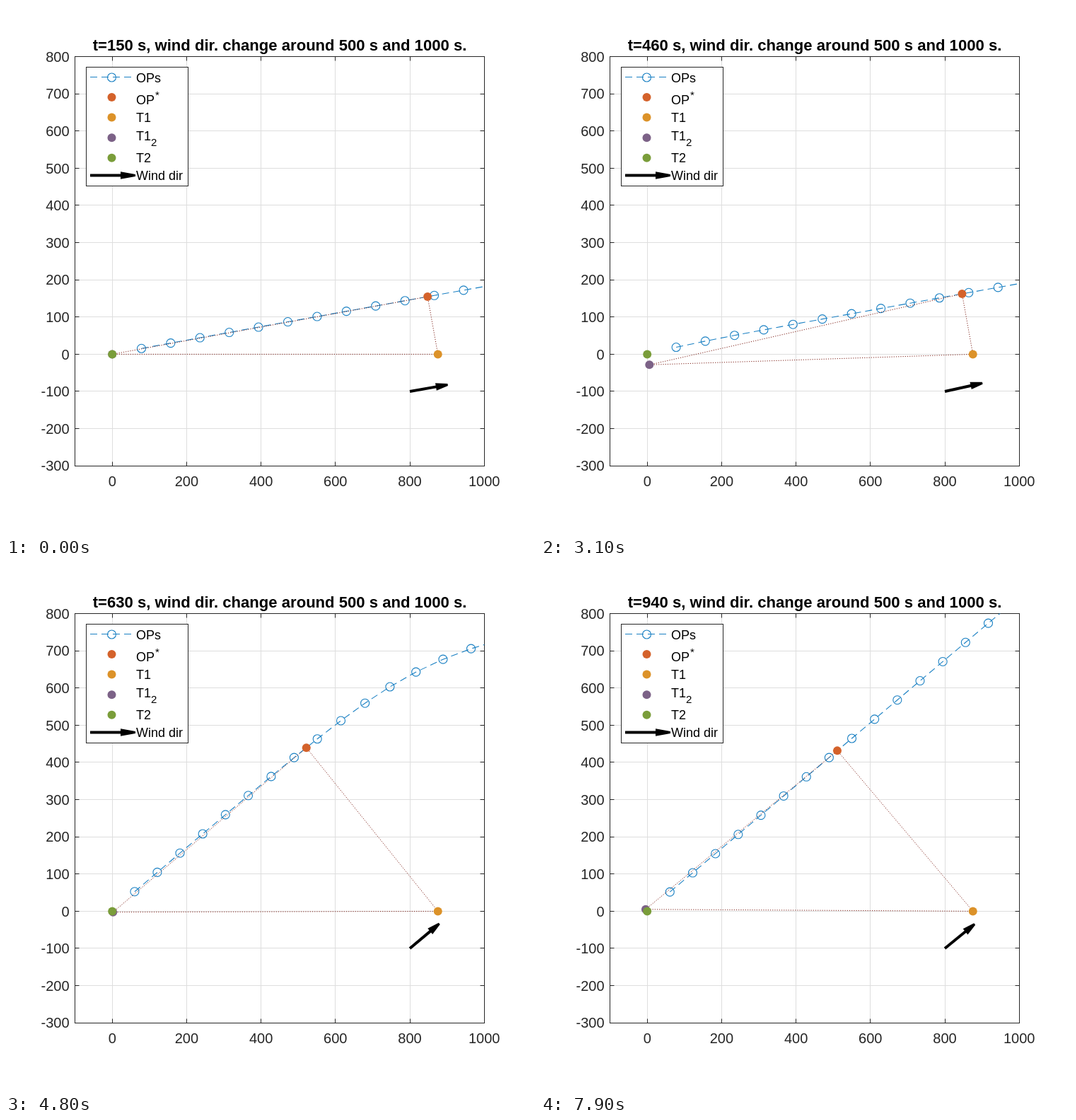
These frames come from a looping animation (748x748 px, 8000 ms). An HTML page with a canvas:

```html
<!DOCTYPE html>
<html>
<head>
<meta charset="utf-8">
<style>
html, body { margin: 0; width: 100%; height: 100%; overflow: hidden; background: #fff; }
canvas { display: block; }
</style>
</head>
<body>
<canvas id="stage" width="748" height="748"></canvas>
<script>
const ctx = document.getElementById('stage').getContext('2d');
const LEFT = 97.5, RIGHT = 676.5, TOP = 71.5, BOTTOM = 650.5;
const SCALE = 0.526, STEP = 80;
const INK = '#262626', BLUE = '#1a80c3', DOTTED = '#80241c';
const COLORS = { op: '#d4622b', t1: '#dc9229', t12: '#7c6287', t2: '#7a9d3a' };
const px = x => 150.2 + x * SCALE;
const py = y => 492.39 - y * SCALE;

const logistic = x => 1 / (1 + Math.exp(-x));
const windAngle = t => (10 + 30 * logistic((t - 500) / 16.5)
  - 30 * logistic((t - 1000) / 16.5)) * Math.PI / 180;
const deflection = k => 1.58 * Math.sqrt(k);

// Every point drifts with the current wind, plus a small crosswind shift.
function wakePoints(t) {
  const points = [];
  let x = 0, y = 0;
  for (let k = 1; k <= 24; k++) {
    const a = windAngle(t - 10 * (k - 1)), d = deflection(k);
    x += STEP * Math.cos(a);
    y += STEP * Math.sin(a);
    points.push([x - d * Math.sin(a), y + d * Math.cos(a)]);
  }
  return points;
}

function nearestOnWake(points, [tx, ty]) {
  let best = { dist: Infinity };
  for (let i = 0; i + 1 < points.length; i++) {
    const [ax, ay] = points[i], [bx, by] = points[i + 1];
    const dx = bx - ax, dy = by - ay;
    const raw = ((tx - ax) * dx + (ty - ay) * dy) / (dx * dx + dy * dy);
    const f = Math.max(0, Math.min(1, raw));
    const pos = [ax + f * dx, ay + f * dy];
    const dist = Math.hypot(pos[0] - tx, pos[1] - ty);
    if (dist < best.dist) best = { dist, pos, k: i + 1 + f };
  }
  return best;
}

function line(points, color, width = 1, dash = []) {
  ctx.beginPath();
  points.forEach(([x, y]) => ctx.lineTo(x, y));
  ctx.strokeStyle = color;
  ctx.lineWidth = width;
  ctx.setLineDash(dash);
  ctx.stroke();
  ctx.setLineDash([]);
}

function circle(x, y, fill) {
  ctx.beginPath();
  ctx.arc(x, y, 6, 0, 7);
  if (fill) {
    ctx.fillStyle = fill;
    ctx.fill();
  } else {
    ctx.strokeStyle = BLUE;
    ctx.lineWidth = 1.1;
    ctx.stroke();
  }
}

function text(str, x, y, size, align = 'left', color = '#000', weight = '') {
  ctx.font = `${weight} ${size}px "Liberation Sans", Arial, sans-serif`;
  ctx.textAlign = align;
  ctx.fillStyle = color;
  ctx.fillText(str, x, y);
}

function arrow(x, y, angle, length, head) {
  ctx.save();
  ctx.translate(x, y);
  ctx.rotate(-angle);
  line([[0, 0], [length - head + 2, 0]], '#000', 4);
  ctx.beginPath();
  ctx.moveTo(length, -1.5);
  ctx.lineTo(length, 1.5);
  ctx.lineTo(length - head, 5.3);
  ctx.lineTo(length - head, -5.3);
  ctx.fillStyle = '#000';
  ctx.fill();
  ctx.restore();
}

function drawAxes() {
  const snap = v => Math.floor(v) + 0.5;
  for (let x = 0; x <= 1000; x += 200) {
    const gx = snap(px(x));
    if (x < 1000) line([[gx, TOP], [gx, BOTTOM]], '#dedede');
    line([[gx, BOTTOM], [gx, BOTTOM - 6]], INK);
    line([[gx, TOP], [gx, TOP + 6]], INK);
    text(x, px(x), 679, 20, 'center', INK);
  }
  for (let y = -300; y <= 800; y += 100) {
    const gy = snap(py(y));
    if (y > -300 && y < 800) line([[LEFT, gy], [RIGHT, gy]], '#dedede');
    line([[LEFT, gy], [LEFT + 6, gy]], INK);
    line([[RIGHT, gy], [RIGHT - 6, gy]], INK);
    text(y, 89.5, py(y) + 7.3, 20, 'right', INK);
  }
  ctx.strokeStyle = INK;
  ctx.lineWidth = 1;
  ctx.strokeRect(LEFT, TOP, RIGHT - LEFT, BOTTOM - TOP);
}

function drawLegend() {
  ctx.fillStyle = '#fff';
  ctx.fillRect(113, 86, 145, 169);
  ctx.strokeStyle = INK;
  ctx.lineWidth = 1;
  ctx.strokeRect(113.5, 86.5, 144, 168);
  line([[119, 100.5], [180, 100.5]], BLUE, 1, [10, 6]);
  circle(149.5, 101);
  Object.values(COLORS).forEach((c, i) => circle(149.5, 129 + 28.6 * i, c));
  arrow(119, 239.5, 0, 64, 21);
  const label = (str, y) => text(str, 184, y, 18);
  label('OPs', 108);
  label('OP', 138.5);
  text('*', 211, 130.5, 15);
  label('T1', 164);
  label('T1', 189.5);
  text('2', 205, 197.5, 15);
  label('T2', 221);
  label('Wind dir', 246);
}

function draw(t) {
  const angle = windAngle(t), cos = Math.cos(angle), sin = Math.sin(angle);
  const wake = wakePoints(t), t1 = [875.5, 0];
  const { pos: op, k } = nearestOnWake(wake, t1);
  const s = STEP * k, d = deflection(k);
  const t12 = [op[0] - s * cos + d * sin, op[1] - s * sin - d * cos];
  const toPx = ([x, y]) => [px(x), py(y)];

  ctx.fillStyle = '#fff';
  ctx.fillRect(0, 0, 748, 748);
  text(`t=${t} s, wind dir. change around 500 s and 1000 s.`, 387, 63, 22.1, 'center', '#000', 'bold');
  drawAxes();

  ctx.save();
  ctx.beginPath();
  ctx.rect(LEFT, TOP, RIGHT - LEFT, BOTTOM - TOP);
  ctx.clip();
  line(wake.map(toPx), BLUE, 1.1, [10, 6]);
  ctx.restore();
  for (const [x, y] of wake.map(toPx)) {
    if (x < RIGHT && y > TOP) circle(x, y);
  }

  for (const [a, b] of [[t12, op], [op, t1], [t12, t1]]) {
    line([toPx(a), toPx(b)], DOTTED, 1, [1.2, 2]);
  }
  circle(...toPx(op), COLORS.op);
  circle(...toPx(t1), COLORS.t1);
  circle(...toPx(t12), COLORS.t12);
  circle(...toPx([0, 0]), COLORS.t2);
  arrow(px(800), py(-100), angle, 54.5, 17);
  drawLegend();
}

function tick() {
  const step = Math.floor(performance.now() % 8000 / 100);
  draw(150 + 10 * step);
  requestAnimationFrame(tick);
}
tick();
</script>
</body>
</html>
```
